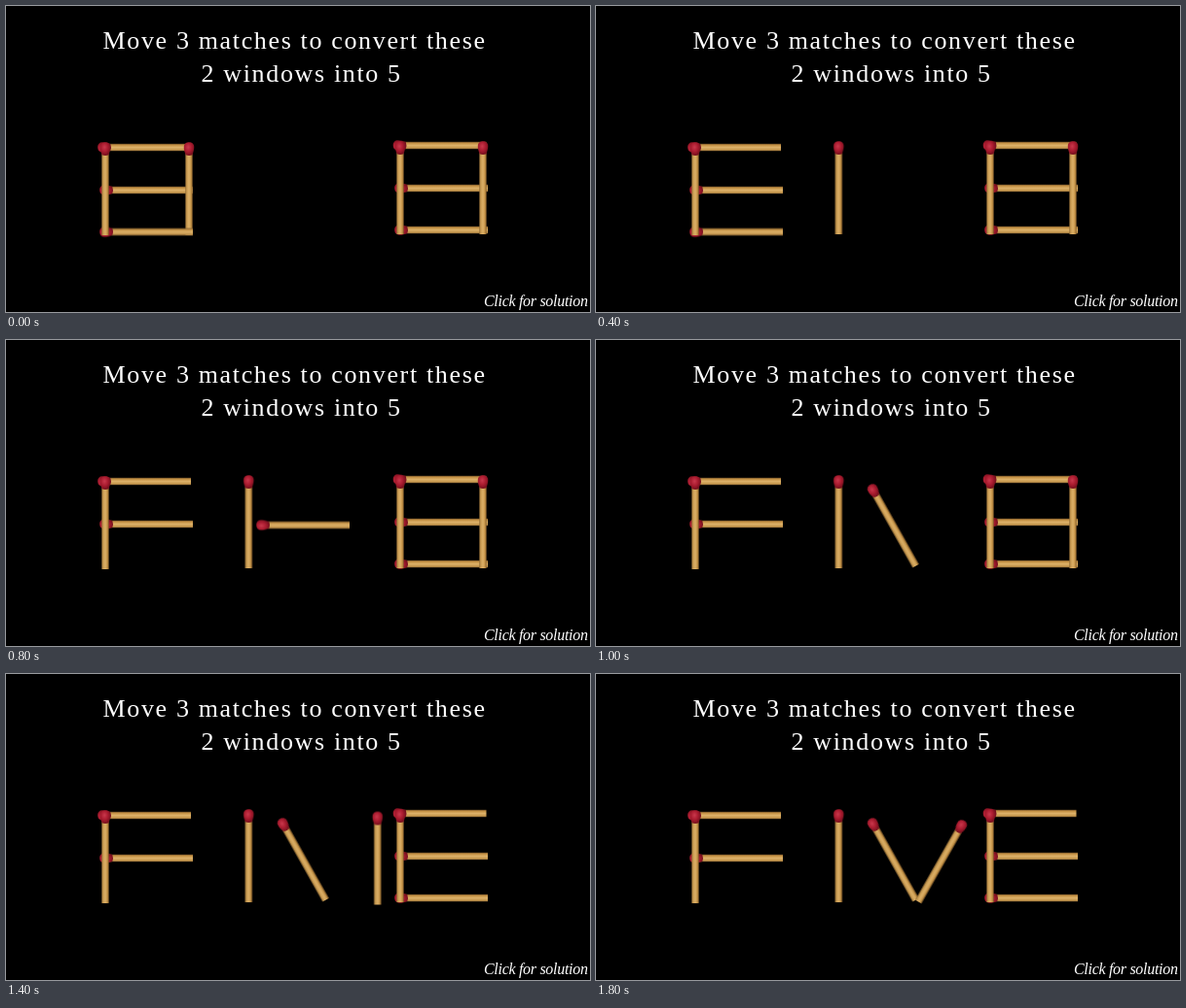
These frames come from a looping animation (600x315 px, 2600 ms). An HTML page:

```html
<!DOCTYPE html>
<html lang="en">
<head>
<meta charset="utf-8">
<title>Match puzzle</title>
<style>
  html, body { margin: 0; width: 100%; height: 100%; overflow: hidden; background: #000; }
  svg { display: block; width: 600px; height: 315px; }
  text { fill: #fff; font-family: "Liberation Serif", serif; }
  .title { font-size: 26px; letter-spacing: 1.65px; }
  .hint { font-size: 16px; font-style: italic; letter-spacing: -0.3px; }
  .match { transform-origin: 0 0; }
</style>
</head>
<body>
<svg viewBox="0 0 600 315">
  <defs>
    <linearGradient id="wood">
      <stop offset="0" stop-color="#8f6a35"/>
      <stop offset=".2" stop-color="#c89a50"/>
      <stop offset=".5" stop-color="#dcb068"/>
      <stop offset=".78" stop-color="#c69447"/>
      <stop offset="1" stop-color="#7d5829"/>
    </linearGradient>
    <radialGradient id="tip" cx=".42" cy=".38" r=".65">
      <stop offset="0" stop-color="#c9384c"/>
      <stop offset=".5" stop-color="#ab1c30"/>
      <stop offset="1" stop-color="#700e1b"/>
    </radialGradient>
    <g id="match">
      <rect x="-3.7" y="4" width="7.4" height="85" fill="url(#wood)"/>
      <path d="M-3.4 6.3C-4.6 3-5.4 .5-5.2-2C-5-5.4-2.6-6.8 .2-6.8C3.2-6.8 5.3-5 5.3-2C5.4 .5 4.4 3.4 3.6 6.3Q0 7.6-3.4 6.3Z" fill="url(#tip)"/>
    </g>
  </defs>
  <text class="title" x="99.5" y="44">Move 3 matches to convert these</text>
  <text class="title" x="200.5" y="78">2 windows into 5</text>
  <text class="hint" x="491" y="309">Click for solution</text>
  <g id="stage"></g>
</svg>
<script>
const LOOP = 2600;
const stage = document.getElementById('stage');

// Each pose: x and y of the head, angle in degrees
const pose = (x, y, angle) => `translate(${x}px, ${y}px) rotate(${angle}deg)`;

function addMatch(x, y, angle = 0) {
  const el = document.createElementNS('http://www.w3.org/2000/svg', 'use');
  el.setAttribute('href', '#match');
  el.setAttribute('class', 'match');
  el.style.transform = pose(x, y, angle);
  stage.append(el);
  return el;
}

// Steps: [time, x, y, angle], each held until the next
function play(steps) {
  const [, ...start] = steps[0];
  const frames = steps.map(([t, ...p]) => ({
    offset: t / LOOP, transform: pose(...p), easing: 'step-end'
  }));
  frames.push({ offset: 1, transform: pose(...steps.at(-1).slice(1)) });
  addMatch(...start).animate(frames, { duration: LOOP, iterations: Infinity });
}

// Fixed matches
addMatch(101, 145.5, -90);
addMatch(103, 189.5, -90);
addMatch(102, 147);
addMatch(404.5, 143.5, -90);
addMatch(406, 187.5, -90);
addMatch(406, 230.5, -90);
addMatch(405, 146);

// Moving matches
play([
  [0, 188, 147, 0],
  [200, 212.7, 146, 0],
  [400, 249.3, 146, 0]
]);
play([
  [0, 103, 232.5, -90],
  [600, 212, 194.5, -90],
  [800, 264, 190.5, -90],
  [1000, 285, 155, -29.3]
]);
play([
  [0, 490, 146, 0],
  [1200, 448, 146, 0],
  [1400, 381.7, 148.5, 0],
  [1600, 330, 145.5, 0],
  [1800, 375, 157, 29.5]
]);

// Left upright stays above the bottom match
stage.append(stage.children[2]);
</script>
</body>
</html>
```
